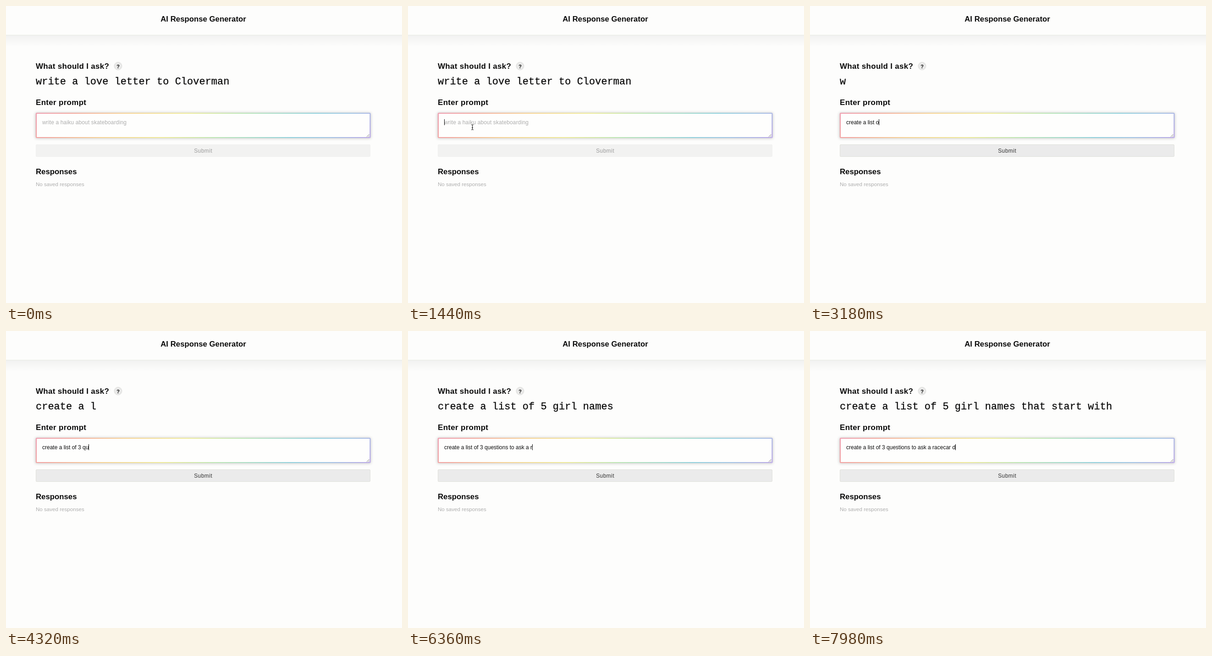
These frames come from a looping animation (864 by 648 pixels, 8000 ms). An HTML page:

```html
<!DOCTYPE html>
<html lang="en">
<head>
<meta charset="utf-8">
<title>AI Response Generator</title>
<style>
  html, body { margin: 0; width: 100%; height: 100%; overflow: hidden; background: #fdfdfc; }
  svg { display: block; width: 864px; height: 648px; }
  text { font: 12px "Liberation Sans", Arial, sans-serif; fill: #0b0b0b; white-space: pre; }
  .heading { font-size: 17px; font-weight: 700; letter-spacing: .3px; }
  .tight { font-size: 16.8px; letter-spacing: 0; }
  .muted { fill: #adadad; }
  #idea { font: 22px "Liberation Mono", "Courier New", monospace; stroke: #0b0b0b; stroke-width: .3px; }
  #placeholder { letter-spacing: .14px; }
  #submit rect { fill: #f2f2f1; stroke: #f0f0ef; }
  #submit text { fill: #9b9b9b; letter-spacing: .45px; }
  #submit.enabled rect { fill: #ebebeb; stroke: #dfe0da; }
  #submit.enabled text { fill: #333; }
</style>
</head>
<body>
<svg viewBox="0 0 864 648">
  <defs>
    <linearGradient id="rainbow" gradientUnits="userSpaceOnUse" x1="65" y1="233" x2="457" y2="625">
      <stop offset="0" stop-color="#ee9cae"/>
      <stop offset=".1" stop-color="#f3a59c"/>
      <stop offset=".25" stop-color="#f7d292"/>
      <stop offset=".42" stop-color="#efea98"/>
      <stop offset=".57" stop-color="#bce6b4"/>
      <stop offset=".78" stop-color="#8fd0dc"/>
      <stop offset=".88" stop-color="#a0c4e4"/>
      <stop offset="1" stop-color="#b9a6e6"/>
    </linearGradient>
    <linearGradient id="headerShade" x2="0" y2="1">
      <stop offset="0" stop-color="#000" stop-opacity=".045"/>
      <stop offset="1" stop-color="#000" stop-opacity="0"/>
    </linearGradient>
    <filter id="blur" x="-5%" y="-30%" width="110%" height="160%"><feGaussianBlur stdDeviation="3"/></filter>
  </defs>

  <rect width="864" height="648" fill="#fdfdfc"/>
  <rect y="64" width="864" height="25" fill="url(#headerShade)"/>
  <rect y="63" width="864" height="1" fill="#e8e9e2"/>
  <text class="heading tight" x="430.5" y="34" text-anchor="middle">AI Response Generator</text>

  <text class="heading" x="65" y="137">What should I ask?</text>
  <circle cx="244.5" cy="131" r="8.5" fill="#e9e9e8" stroke="#dededc"/>
  <text x="244.5" y="135.5" text-anchor="middle" style="font-size:11px;font-weight:700">?</text>
  <text id="idea" x="65" y="171"></text>

  <text class="heading" x="65" y="216">Enter prompt</text>
  <rect x="64" y="233" width="732" height="56" rx="2" fill="#000" opacity=".2" filter="url(#blur)"/>
  <rect x="66" y="234" width="728.5" height="53" rx="1" fill="#fefefd" stroke="url(#rainbow)" stroke-width="2.2"/>
  <path d="M787 285.5l5.5-5.5M790.500 285.500l2-2" stroke="#777" fill="none"/>
  <text id="placeholder" class="muted" x="79" y="257.500">write a haiku about skateboarding</text>
  <text id="prompt" x="79" y="257.500"></text>
  <rect id="caret" y="247" width="1" height="13" fill="#000"/>
  <path id="pointer" d="M-2.500-5.500h2l.5.5.500-.5h2M0-5V5M-2.500 5.500h2L0 5l.500.500h2M-1.500 1h3" fill="none" stroke="#111"/>

  <g id="submit">
    <rect x="65.500" y="302.500" width="729" height="26" rx="1.500"/>
    <text x="430.200" y="319.500" text-anchor="middle">Submit</text>
  </g>

  <text class="heading tight" x="65" y="367">Responses</text>
  <text class="muted" x="65" y="393" style="font-size:11.6px">No saved responses</text>
</svg>

<script>
const LOOP = 8000;
const CLICK = 1080;
const OLD_IDEA = "write a love letter to Cloverman";
const NEW_IDEA = "create a list of 5 girl names that start with";
const PROMPT = "create a list of 3 questions to ask a racecar d";

// [time in ms, visible characters]
const typing = [[1380, 0], [2020, 5], [3180, 15], [4320, 21], [6360, 39], [7980, 47]];
const erasing = [[2100, 32], [3180, 1], [3240, 0]];
const suggesting = [[3270, 0], [4320, 10], [6360, 29], [7980, 45]];

const el = id => document.getElementById(id);
const [idea, placeholder, prompt, caret, pointer, submit] =
  ["idea", "placeholder", "prompt", "caret", "pointer", "submit"].map(el);

function valueAt(keys, t) {
  if (t <= keys[0][0]) return keys[0][1];
  for (let i = 1; i < keys.length; i++) {
    const [t0, v0] = keys[i - 1], [t1, v1] = keys[i];
    if (t <= t1) return v0 + (v1 - v0) * (t - t0) / (t1 - t0);
  }
  return keys[keys.length - 1][1];
}

const typed = (text, keys, t) => text.slice(0, Math.round(valueAt(keys, t)));
const show = (node, visible) => { node.style.display = visible ? "" : "none"; };

function draw(t) {
  idea.textContent = t < 3250 ? typed(OLD_IDEA, erasing, t) : typed(NEW_IDEA, suggesting, t);

  const entered = typed(PROMPT, typing, t);
  prompt.textContent = entered;
  show(placeholder, !entered);
  submit.classList.toggle("enabled", entered.length > 0);

  show(caret, t >= CLICK);
  caret.setAttribute("x", Math.round(79 + (entered ? prompt.getComputedTextLength() : 0)));

  // The pointer glides into the field and hides once typing begins.
  const left = (1 - Math.min(1, Math.max(0, (t - 300) / 400))) ** 2;
  pointer.setAttribute("transform", `translate(${140.5 + 65 * left} ${264.5 + 130 * left})`);
  show(pointer, t >= 300 && !entered);
}

function frame(now) {
  draw(now % LOOP);
  requestAnimationFrame(frame);
}
draw(0);
requestAnimationFrame(frame);
</script>
</body>
</html>
```
